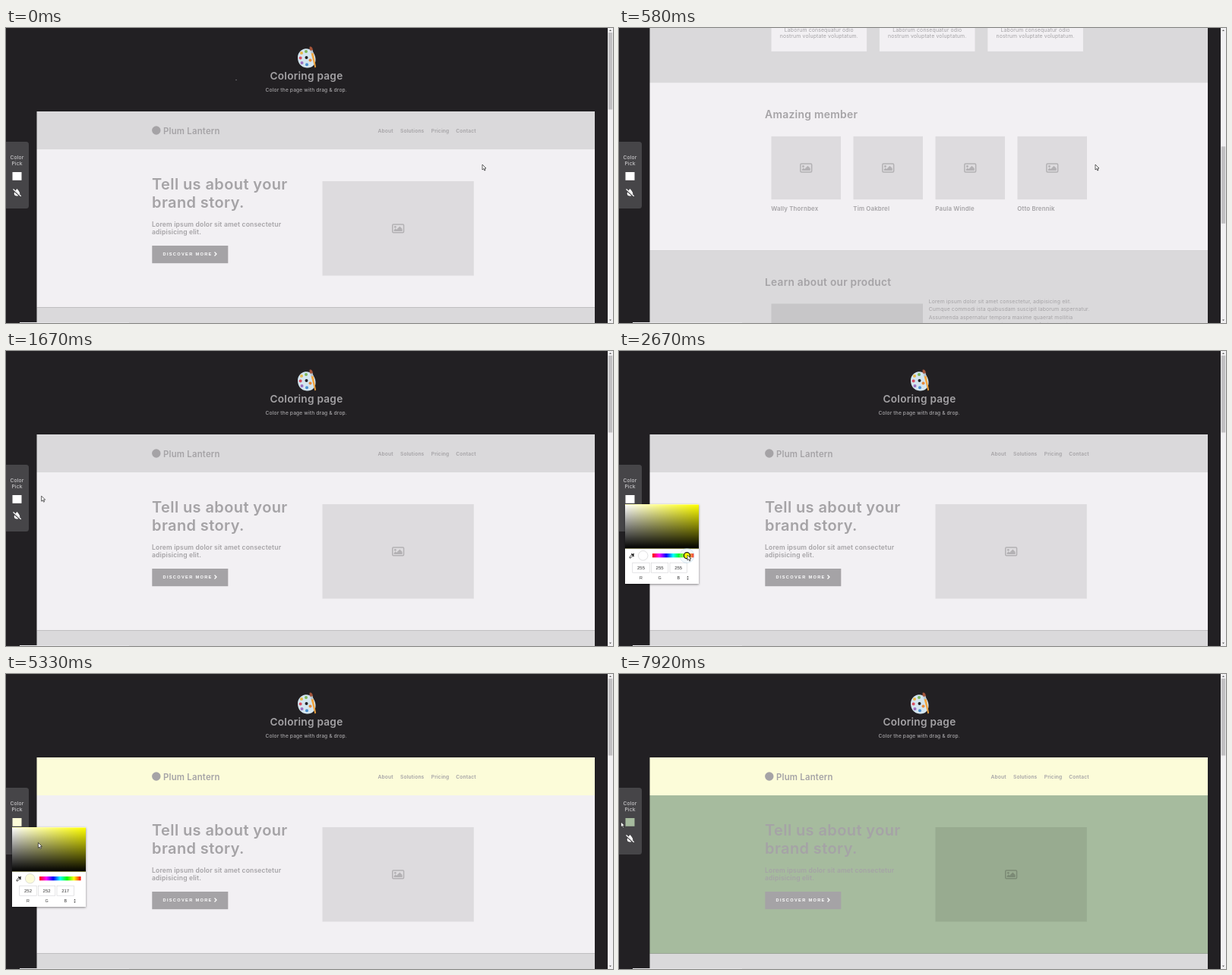
Animation, 799 px wide and 389 px high, one loop 8000 ms. Source, as an HTML page:

```html
<!DOCTYPE html>
<html lang="en">
<head>
<meta charset="utf-8">
<title>Coloring page</title>
<style>
html, body { margin: 0; width: 100%; height: 100%; overflow: hidden; background: #222023; }
svg { display: block; width: 100vw; height: 100vh; }
text { font-family: Inter, "Open Sans", sans-serif; letter-spacing: .02em; fill: #a5a3a6; white-space: pre; }
.b { font-weight: 600; }
.m { font-weight: 500; }
.c { text-anchor: middle; }
.ui { font-family: "Liberation Sans", Arial, sans-serif; letter-spacing: 0; fill: #333; font-size: 6px; text-anchor: middle; }
.btn { font-family: "Liberation Sans", Arial, sans-serif; font-weight: 700; font-size: 5.6px; letter-spacing: 1.35px; fill: #fff; }
</style>
</head>
<body>
<svg id="stage" viewBox="0 0 799 389" preserveAspectRatio="none">
  <defs>
    <linearGradient id="white"><stop stop-color="#fff"/><stop offset="1" stop-color="#fff" stop-opacity="0"/></linearGradient>
    <linearGradient id="black" x2="0" y2="1"><stop stop-opacity="0"/><stop offset="1"/></linearGradient>
    <linearGradient id="rainbow"></linearGradient>
    <filter id="shadow" x="-20%" y="-20%" width="140%" height="140%">
      <feDropShadow dx="0" dy="1" stdDeviation="1.6" flood-opacity=".45"/>
    </filter>
    <g id="photo" fill="none" stroke="#000" stroke-opacity=".19" stroke-width="1.5">
      <rect x="-7.4" y="-5.4" width="14.8" height="10.8" rx="1.2"/>
      <circle cx="-3.8" cy="-2" r="1.4" fill="#000" fill-opacity=".19" stroke="none"/>
      <path d="M-5.5 3.6V2L-3.5 0L-2 1.5L2.2 -2.7L5.5 .6V3.6Z" fill="#000" fill-opacity=".19" stroke="none"/>
    </g>
  </defs>
  <rect width="799" height="389" fill="#222023"/>
  <g id="page"></g>
  <circle id="speck" cx="303" cy="68.5" r=".8" fill="#77757a"/>
  <rect x="18" y="388" width="144" height="1" fill="#e6e5e8"/>
  <g id="bar">
    <rect x="792" width="7" height="389" fill="#f1f0f2"/>
    <path d="M794 4L795.5 2.2L797 4ZM794 384.5L795.5 386.3L797 384.5Z" fill="#555"/>
    <rect id="thumb" x="792.8" y="6" width="5.4" height="101.5" fill="#c1c0c2"/>
  </g>
  <g id="panel">
    <path d="M0 150H26.5Q30 150 30 153.500V234.500Q30 238 26.500 238H0Z" fill="#464548"/>
    <text class="m c" x="14.500" y="172.800" font-size="6.700" style="fill:#c9c8ca">Color</text>
    <text class="m c" x="14.500" y="180.800" font-size="6.700" style="fill:#c9c8ca">Pick</text>
    <rect id="swatch" x="8.500" y="190" width="12" height="10.800"/>
    <path d="M14.500 212C17 215 18.200 216.600 18.200 218.300A3.700 3.300 0 0 1 10.800 218.300C10.800 216.600 12 215 14.500 212Z" fill="#fff"/>
    <path d="M9 212.800L19.500 222.300" stroke="#464548" stroke-width="2.400"/>
    <path d="M9.500 212.500L19.700 221.700" stroke="#fff" stroke-width="1.200"/>
  </g>
  <g id="picker">
    <rect x="8" y="202" width="97" height="105" fill="#fff" filter="url(#shadow)"/>
    <rect id="field" x="8" y="202.500" width="97" height="58"/>
    <rect x="8" y="202.500" width="97" height="58" fill="url(#white)"/>
    <rect x="8" y="202.500" width="97" height="58" fill="url(#black)"/>
    <path d="M14 273L14.300 271.300L17.300 268.300L18.700 269.700L15.700 272.700Z" fill="none" stroke="#222" stroke-width=".9"/>
    <path d="M16.800 267.800L19.200 270.200M18 269L19.300 267.700" stroke="#111" stroke-width="1.500" stroke-linecap="round"/>
    <circle id="chip" cx="31.700" cy="269.800" r="6.300" stroke="#c9c9cc" stroke-width=".6"/>
    <rect x="44" y="267" width="54.500" height="5.300" fill="url(#rainbow)"/>
    <g id="fields"></g>
    <path d="M89.300 298.500L90.500 296.800L91.700 298.500ZM89.300 300L90.500 301.700L91.700 300Z" fill="#333"/>
    <circle id="halo" r="9.500" fill="#cfe6f5" fill-opacity=".25" stroke="#b5d6ea" stroke-opacity=".6" stroke-width=".8"/>
    <circle id="knob" stroke="#1a1a1a" stroke-width="1.300"/>
  </g>
  <rect id="ghost" width="12" height="12" fill-opacity=".95"/>
  <path id="arrow" d="M0 0V7L1.700 5.500L2.800 8L4 7.500L2.900 5H5Z" fill="#fff" stroke="#222" stroke-width=".7"/>
  <g id="move">
    <path d="M0 -4.600L1.700 -2.600H.6V-.6H2.600V-1.700L4.600 0L2.600 1.700V.6H.6V2.600H1.700L0 4.600L-1.700 2.600H-.6V.6H-2.600V1.700L-4.600 0L-2.600 -1.700V-.6H-.6V-2.600H-1.700Z" fill="#333" stroke="#fff" stroke-width=".5"/>
  </g>
</svg>
<script>
const LOOP = 8000, FPS = 12;
const $ = id => document.getElementById(id);
const GREY = '#dad9db', PALE = '#f2f0f3';

const rect = (x, y, w, h, fill, extra = '') =>
  `<rect x="${x}" y="${y}" width="${w}" height="${h}" fill="${fill}" ${extra}/>`;
const text = (s, x, y, size, cls = 'b') =>
  `<text x="${x}" y="${y}" font-size="${size}" class="${cls}">${s}</text>`;
const lines = (list, x, y, step, size, cls) =>
  list.map((s, i) => text(s, x, y + i * step, size, cls)).join('');
const photo = (x, y, w, h) => rect(x, y, w, h, '#000', 'fill-opacity=".087"') +
  `<use href="#photo" x="${x + w / 2}" y="${y + h / 2}"/>`;

function emoji() {
  const dots = [[389, 33, '#e8b84a'], [395, 31, '#7cb65a'], [387.6, 39.5, '#d94f62'],
    [389.5, 46, '#9a6fc0'], [396, 48.2, '#4b8fd0'], [400.5, 42.5, '#e58a3c']];
  return '<path d="M393 27.500C400 26 407 32 407.500 41C408 49 402 53 396 52.500C388 52 384 46 384 39C384 33 388 28.500 393 27.500Z" fill="#d3e5ef"/>' +
    '<circle cx="395.500" cy="39" r="2" fill="#222023"/>' +
    dots.map(([x, y, f]) => `<circle cx="${x}" cy="${y}" r="2" fill="${f}"/>`).join('') +
    '<path d="M401.500 33L404.500 32.500L408 51.500L406.500 52.500Z" fill="#f2a43c"/>' +
    '<path d="M400.500 29.500L403.700 29L404.500 33L401.500 33.500Z" fill="#b9c4cc"/>' +
    '<path d="M399.800 24.500Q403.500 24 403.900 29.200L400.300 29.800Q398.800 27 399.800 24.500Z" fill="#a4553a"/>';
}

function card(x, title) {
  const mid = x + 62.8;
  return rect(x, 439, 125.600, 187, PALE) + rect(x, 439, 125.600, 83.300, GREY) + photo(x, 439, 125.600, 83.300) +
    text(title, mid, 547.5, 7.9, 'b c') +
    lines(['Lorem ipsum dolor sit amet', 'consectetur adipisicing elit.', 'Facilis quidem ab animi',
      'repellat minima eveniet.', 'Laborum consequatur odio', 'nostrum voluptate voluptatum.'], mid, 568, 8, 6.9, 'c');
}

function buildPage() {
  const members = ['Wally Thornbex', 'Tim Oakbrel', 'Paula Windle', 'Otto Brennik'];
  const nav = [['About', 489.5], ['Solutions', 519], ['Pricing', 559.7], ['Contact', 592.3]];
  $('page').innerHTML = emoji() +
    text('Coloring page', 395.5, 67.5, 13.6, 'b c') +
    text('Color the page with drag &amp; drop.', 395.3, 83.5, 6.67, 'm c') +
    rect(40.5, 110, 734.5, 50, GREY, 'id="header"') +
    '<circle cx="197.800" cy="135" r="5.700" fill="#a5a3a6"/>' +
    text('Plum Lantern', 207, 139.5, 11.3) +
    nav.map(([s, x]) => text(s, x, 137.5, 6.7)).join('') +
    rect(40.5, 160, 734.5, 208.7, PALE, 'id="hero"') +
    lines(['Tell us about your', 'brand story.'], 192, 213, 24, 20, 'b') +
    lines(['Lorem ipsum dolor sit amet consectetur', 'adipisicing elit.'], 192, 262.3, 9.8, 8.55, 'b') +
    rect(192.300, 287, 100, 23.2, '#a5a3a6') +
    '<text class="btn" x="206.500" y="300.200">DISCOVER MORE</text>' +
    '<path d="M274.500 295.500L277 298L274.500 300.500" fill="none" stroke="#fff" stroke-width="1.200"/>' +
    photo(416.5, 202, 199.3, 124.6) +
    rect(40.5, 368.7, 734.5, 298.5, GREY) +
    text('Custom solutions', 192, 414.700, 13.6) +
    card(200.5, 'Reactive tools') + card(342.9, 'Invisible guides') + card(485.3, 'Fancy other stuff') +
    rect(40.5, 667.2, 734.5, 221, PALE) +
    text('Amazing member', 192, 714, 13.9) +
    members.map((s, i) => photo(200.5 + i * 108, 738, 91.5, 83.3) + text(s, 200.3 + i * 108, 836.5, 7.9)).join('') +
    rect(40.5, 888.2, 734.5, 557, GREY) +
    text('Learn about our product', 192, 934.7, 13.7) +
    photo(200.5, 958.7, 199.5, 125) +
    lines(['Lorem ipsum dolor sit amet consectetur, adipisicing elit.',
      'Cumque commodi ista quibusdam suscipit laborum aspernatur.',
      'Assumenda aspernatur tempora maxime quaerat mollitia',
      'voluptates nemo dolorem quia repellendus fugiat omnis.',
      'Dolores possimus eligendi natus sapiente veritatis.'], 407.7, 958, 10.4, 6.85, '') +
    '<rect id="outline" x="41" width="733.500" fill="none" stroke="#5b4fd0" stroke-width="1.200"/>';
}

function buildPicker() {
  for (let i = 0; i <= 6; i++) {
    const stop = document.createElementNS('http://www.w3.org/2000/svg', 'stop');
    stop.setAttribute('offset', i / 6);
    stop.setAttribute('stop-color', `hsl(${360 - i * 60},100%,50%)`);
    $('rainbow').append(stop);
  }
  $('fields').innerHTML = ['R', 'G', 'B'].map((s, i) => {
    const x = 29 + i * 24.6;
    return rect(x - 11.2, 279.2, 22.4, 13, '#fff', 'stroke="#d2d2d5" stroke-width=".6"') +
      `<text class="ui num" x="${x}" y="288"></text><text class="ui" x="${x}" y="301.200" style="font-size:5.400px">${s}</text>`;
  }).join('');
}

// Each key is [time, ...values]; values run linearly between keys.
function track(keys, t) {
  const n = keys.findIndex(k => k[0] > t);
  if (n === 0) return keys[0].slice(1);
  if (n < 0) return keys[keys.length - 1].slice(1);
  const a = keys[n - 1], b = keys[n], p = (t - a[0]) / (b[0] - a[0]);
  return a.slice(1).map((v, i) => v + (b[i + 1] - v) * p);
}

const SCROLL = [[30, 0], [583, 595], [650, 630], [1000, 166.5], [1170, 0]];
const HUE = [[2420, 0], [2500, 45], [2660, 60], [5560, 60], [5900, 103.6]];
const TONE = [[2830, 0, 1], [3080, .14, .99], [6170, .14, .99], [6583, .246, .525], [6850, .155, .733]];
const POINTER = [
  [0, 627, 180], [920, 627, 180], [1000, 625.5, 175.5], [1300, 330, 165], [1600, 60, 190],
  [1830, 14, 194], [2000, 14, 194], [2420, 93, 268], [2660, 90, 269], [2800, 90, 269],
  [3080, 22, 203], [3250, 22, 203], [3400, 19.5, 194], [3500, 48, 150], [3580, 120, 152],
  [3680, 250, 168], [3850, 420, 165], [4000, 508, 138.5], [4200, 545, 135], [4420, 545, 135],
  [4700, 350, 170], [5080, 15, 195], [5200, 15, 195], [5560, 89, 269], [5900, 82.5, 269],
  [6170, 82.5, 269], [6583, 32.5, 225.5], [6850, 23, 217], [6950, 23, 216], [7050, 19.5, 194],
  [7330, 260, 240], [7560, 260, 240], [7900, 2.5, 195]
];

const within = (t, ...spans) => spans.some(([a, b]) => t >= a && t < b);
const show = (id, on) => $(id).setAttribute('display', on ? 'inline' : 'none');
const set = (id, attrs) => { for (const k in attrs) $(id).setAttribute(k, attrs[k]); };

function hsv(h, s, v) {
  return [5, 3, 1].map(n => {
    const k = (n + h / 60) % 6;
    return Math.round(255 * v * (1 - s * Math.max(0, Math.min(k, 4 - k, 1))));
  });
}

function draw(t) {
  const [scroll] = track(SCROLL, t), [hue] = track(HUE, t), [sat, val] = track(TONE, t);
  const [x, y] = track(POINTER, t);
  const rgb = hsv(hue, sat, val), color = `rgb(${rgb})`, pure = `hsl(${hue},100%,50%)`;
  const dragging = within(t, [3400, 4420], [7050, 7560]);
  const open = within(t, [2000, 3250], [5200, 6980]);
  const sliding = within(t, [2420, 2830], [5560, 6170]);
  const toning = within(t, [2830, 3250], [6170, 6980]);

  set('page', { transform: `translate(0 ${-scroll})` });
  set('thumb', { y: 6 + scroll / 3.96 });
  show('speck', t < 80);
  set('header', { fill: t < 4460 ? GREY : `rgb(${hsv(60, .14, .99)})` });
  set('hero', { fill: t < 7575 ? PALE : color });

  const overHeader = y < 160;
  show('outline', dragging && x > 40);
  set('outline', overHeader ? { y: 110.5, height: 49 } : { y: 160.5, height: 208 });

  show('swatch', !dragging);
  set('swatch', { fill: color });
  show('picker', open);
  set('field', { fill: pure });
  set('chip', { fill: color });
  document.querySelectorAll('.num').forEach((el, i) => { el.textContent = rgb[i]; });

  const hueX = 44 + 54.5 * (1 - hue / 360);
  show('knob', sliding || toning);
  set('knob', sliding ? { cx: hueX, cy: 269.7, r: 4, fill: pure }
    : { cx: 8 + 97 * sat, cy: 202.5 + 58 * (1 - val), r: 2.6, fill: color });
  show('halo', sliding);
  set('halo', { cx: hueX, cy: 270 });

  show('ghost', dragging);
  set('ghost', { x: x - 11, y: y - 4, fill: color });
  show('move', dragging);
  show('arrow', !dragging);
  set(dragging ? 'move' : 'arrow', { transform: `translate(${x} ${y})` });
}

buildPage();
buildPicker();
const start = performance.now();
function frame() {
  const t = (performance.now() - start) % LOOP;
  draw(Math.floor((t + 4) * FPS / 1000) * 1000 / FPS % LOOP);
  requestAnimationFrame(frame);
}
frame();
</script>
</body>
</html>
```
